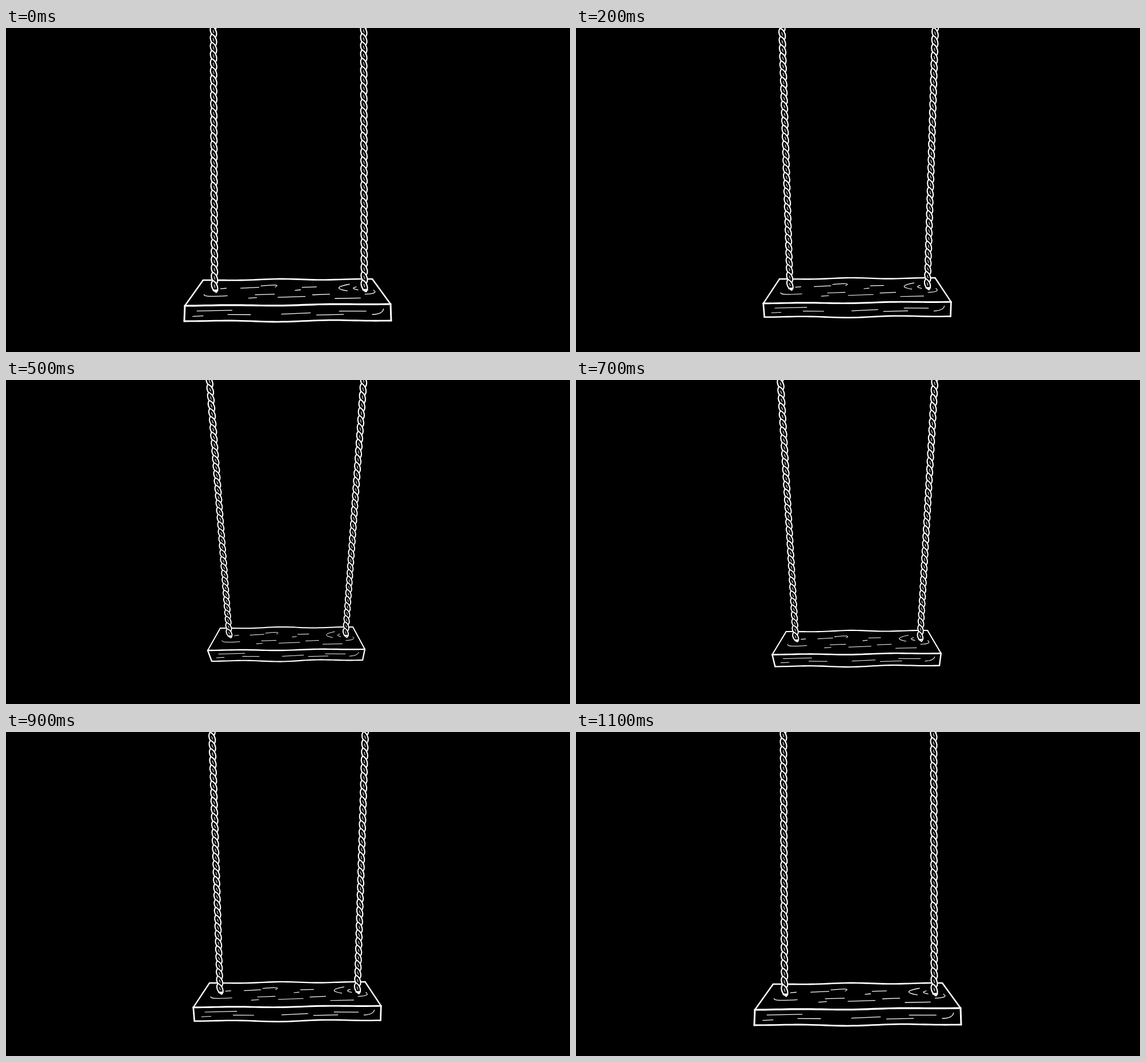
An HTML page with a canvas that plays this animation: 987 by 568 pixels, repeating every 1200 ms.

```html
<!DOCTYPE html>
<html lang="en">
<head>
<meta charset="utf-8">
<title>Swing</title>
<style>
  html, body { margin: 0; width: 100%; height: 100%; overflow: hidden; background: #000; }
  canvas { display: block; }
</style>
</head>
<body>
<canvas id="stage" width="987" height="568"></canvas>
<script>
const ctx = document.getElementById('stage').getContext('2d');
const STEP = 100;
const PITCH = 14.4;

// How far the swing has moved away (0 to 1), and its vertical offset.
const SWING = [0, 0.13, 0.37, 0.51, 0.76, 1];
const LIFT = [0, -2, -2, 1, -1, -7];

// Wood grain in face units: start across, depth, length.
const TOP_DASHES = [
  [0.13, 0.33, 0.03], [0.24, 0.31, 0.1], [0.33, 0.58, 0.1], [0.3, 0.71, 0.04],
  [0.45, 0.68, 0.14], [0.54, 0.42, 0.03], [0.58, 0.3, 0.08], [0.63, 0.6, 0.09],
  [0.74, 0.76, 0.13]
];
const FRONT_DASHES = [
  [0.06, 0.34, 0.17], [0.04, 0.68, 0.05], [0.21, 0.6, 0.11],
  [0.47, 0.52, 0.14], [0.64, 0.65, 0.13], [0.75, 0.43, 0.13]
];

const mix = (a, b, k) => a + (b - a) * k;

// A seat edge; its shape bends a little around the middle.
function edge(left, leftY, right, rightY, bend) {
  return u => [
    mix(left, right, u),
    mix(leftY, rightY, u) + bend * Math.sin(Math.PI * u) * Math.cos(11 * (u - 0.45))
  ];
}

function makePose(s, lift) {
  const backY = 442 + lift;
  const frontY = backY + 45 - 6 * s;
  const baseY = frontY + 27 - 8 * s;
  const endY = backY + 20 - 4 * s;
  return {
    size: 1 - 0.236 * s,
    back: edge(345 + 30 * s, backY, 641 - 34 * s, backY - 2, -1.2),
    front: edge(313 + 40 * s, frontY, 673 - 45 * s, frontY - 3 + s, 1),
    base: edge(312 + 48 * s, baseY, 674 - 50 * s, baseY - 1 - s, 1.5),
    ropes: [
      { top: 363 - 7 * s, end: 365 + 26 * s, endY },
      { top: 626 + 3 * Math.sin(Math.PI * s), end: 627 - 33 * s, endY: endY - 1 }
    ]
  };
}
const POSES = SWING.map((s, i) => makePose(s, LIFT[i]));

// Place on the face between two edges.
function face(near, far) {
  return (u, v) => {
    const [ax, ay] = near(u), [bx, by] = far(u);
    return [mix(ax, bx, v), mix(ay, by, v)];
  };
}

function line(points, width) {
  ctx.lineWidth = width;
  ctx.beginPath();
  for (const p of points) ctx.lineTo(...p);
  ctx.stroke();
}

function curve(a, b, c, width) {
  ctx.lineWidth = width;
  ctx.beginPath();
  ctx.moveTo(...a);
  ctx.quadraticCurveTo(...b, ...c);
  ctx.stroke();
}

function drawEdge(at, width) {
  line(Array.from({ length: 41 }, (_, i) => at(i / 40)), width);
}

function drawSeat({ back, front, base, size }) {
  const top = face(back, front);
  const side = face(front, base);
  const thin = 1.3 * size;

  drawEdge(back, 2.6 * size);
  drawEdge(front, 3.2 * size);
  drawEdge(base, 2.8 * size);
  for (const u of [0, 1]) {
    line([back(u), front(u)], 2.5 * size);
    line([front(u), base(u)], 3 * size);
  }

  const dash = (at, [u, v, length]) => line([at(u, v + 0.01), at(u + length, v - 0.01)], thin);
  for (const d of TOP_DASHES) dash(top, d);
  for (const d of FRONT_DASHES) dash(side, d);

  // Curls: one by the left rope, the hook, the knot around the right rope.
  curve(top(0.06, 0.56), top(0.06, 0.68), top(0.185, 0.62), thin);
  curve(top(0.35, 0.25), top(0.47, 0.18), top(0.43, 0.3), thin);
  curve(top(0.85, 0.2), top(0.73, 0.33), top(0.82, 0.46), thin);
  curve(top(0.88, 0.31), top(0.84, 0.36), top(0.88, 0.43), thin);
  curve(top(0.963, 0.44), top(0.98, 0.58), top(0.905, 0.6), thin);
  curve(side(0.91, 0.62), side(0.96, 0.6), side(0.965, 0.28), thin);
}

// One strand of the twist.
function drawStrand(x, y, angle, scale) {
  ctx.save();
  ctx.translate(x, y);
  ctx.rotate(angle);
  ctx.scale(Math.sqrt(scale), scale);
  ctx.lineWidth = 2.2;
  ctx.beginPath();
  ctx.moveTo(-3, -10.5);
  ctx.bezierCurveTo(-8, -5, -5, 6, 3, 10.5);
  ctx.bezierCurveTo(8, 5, 5, -6, -3, -10.5);
  ctx.fill();
  ctx.stroke();
  line([[-0.8, -3], [0.8, 2]], 1.1);
  ctx.restore();
}

function drawRope({ top, end, endY }, size) {
  const angle = Math.atan2(top - end, endY);
  const strands = [];
  for (let y = endY - 9 * size; y > -PITCH;) {
    const scale = mix(1, size, Math.max(0, y / endY));
    strands.unshift([y, scale]);
    y -= PITCH * scale;
  }
  for (const [y, scale] of strands) drawStrand(mix(top, end, y / endY), y, angle, scale);
  line([[end - 2 * size, endY - 2], [end + 5 * size, endY - 2]], 3 * size);
}

function draw(pose) {
  ctx.fillStyle = '#000';
  ctx.fillRect(0, 0, 987, 568);
  ctx.strokeStyle = '#fff';
  ctx.lineCap = ctx.lineJoin = 'round';
  drawSeat(pose);
  for (const rope of pose.ropes) drawRope(rope, pose.size);
}

// Away through every pose, then back the same way.
function tick() {
  const count = POSES.length;
  const step = Math.floor(performance.now() / STEP) % (2 * count);
  draw(POSES[Math.min(step, 2 * count - 1 - step)]);
  requestAnimationFrame(tick);
}
tick();
</script>
</body>
</html>
```
